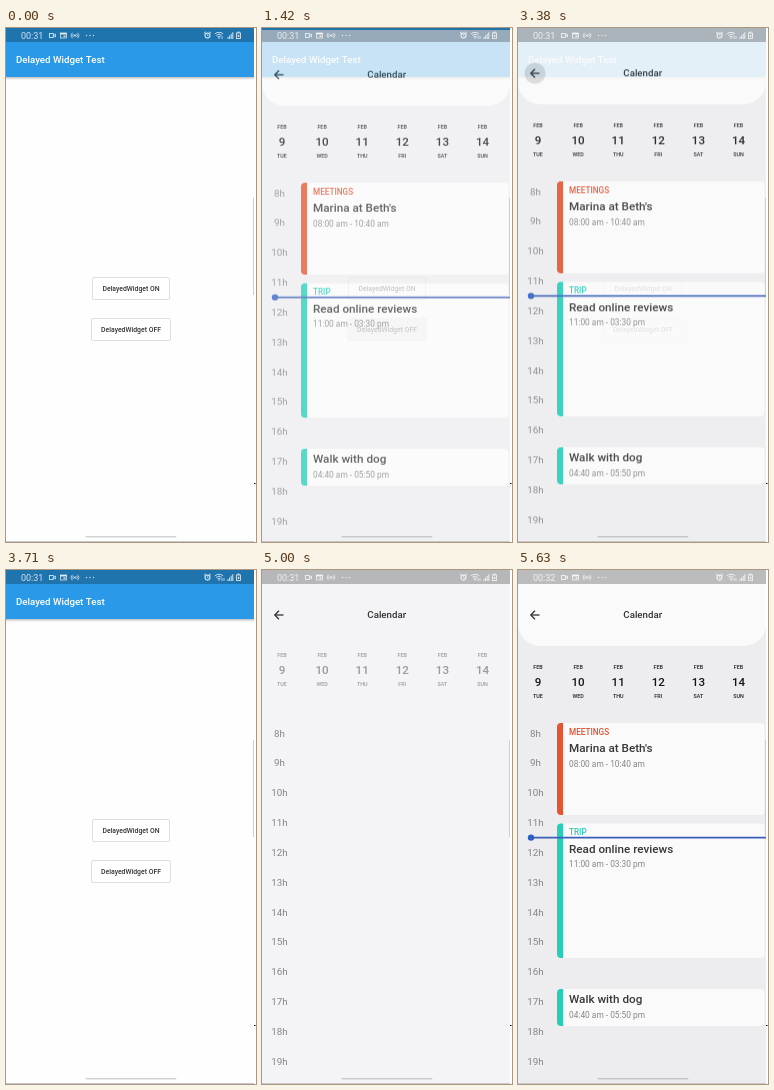
An HTML page with a canvas for the animation above (6.59 s loop, 250 by 514 pixels).

```html
<!DOCTYPE html>
<html lang="en">
<head>
<meta charset="utf-8">
<title>Delayed Widget Test</title>
<style>
  html, body { margin: 0; width: 100%; height: 100%; overflow: hidden; background: #fff; }
  canvas { display: block; width: 250px; height: 514px; }
</style>
</head>
<body>
<canvas id="stage"></canvas>
<script>
const W = 250, H = 514, SCREEN = 248, LOOP = 6590;
const ratio = window.devicePixelRatio || 1;
const TICKS = [0, 920, 1170, 1250, 1330, 1420, 1500, 3380, 3460, 3540, 3630, 3710,
  4670, 4750, 4830, 4920, 5000, 5050, 5130, 5210, 5300, 5380, 5460, 5550, 5630];
const OPEN_OFF = 1165, CLOSE = 3361, OPEN_ON = 4665, ROUTE = 300;

function sized(canvas) {
  canvas.width = W * ratio;
  canvas.height = H * ratio;
  const c = canvas.getContext('2d');
  c.scale(ratio, ratio);
  return c;
}
const stage = sized(document.getElementById('stage'));
const layer = document.createElement('canvas');
const page = sized(layer);

const clamp = v => Math.max(0, Math.min(1, v));
const progress = (t, start, length) => clamp((t - start) / length);

function bezier(x1, y1, x2, y2) {
  const at = (a, b, s) => 3 * a * s * (1 - s) ** 2 + 3 * b * s * s * (1 - s) + s ** 3;
  return x => {
    let lo = 0, hi = 1;
    for (let i = 0; i < 24; i++) {
      const mid = (lo + hi) / 2;
      if (at(x1, x2, mid) < x) lo = mid; else hi = mid;
    }
    return at(y1, y2, lo);
  };
}
const fadeCurve = bezier(0.42, 0, 1, 1);
const slideCurve = bezier(0.4, 0, 0.2, 1);

function text(c, str, x, y, size, weight, color, align = 'left') {
  c.font = `${weight} ${size}px Roboto, sans-serif`;
  c.textAlign = align;
  c.fillStyle = color;
  c.fillText(str, x, y);
}

function box(c, x, y, w, h, color, radii = 0) {
  c.beginPath();
  c.roundRect(x, y, w, h, radii);
  c.fillStyle = color;
  c.fill();
}

function disc(c, x, y, r, color) {
  c.beginPath();
  c.arc(x, y, r, 0, 7);
  c.fillStyle = color;
  c.fill();
}

function lines(c, points, color, width) {
  c.beginPath();
  points.forEach(([x, y], i) => i ? c.lineTo(x, y) : c.moveTo(x, y));
  c.strokeStyle = color;
  c.lineWidth = width;
  c.stroke();
}

function arc(c, x, y, r, from, to) {
  c.beginPath();
  c.arc(x, y, r, from, to);
  c.stroke();
}

function button(c, label, x, y, w, h, pressed) {
  box(c, x, y, w, h, pressed ? '#ebebeb' : '#fff', 1.5);
  c.strokeStyle = pressed ? '#e3e3e3' : '#dedede';
  c.lineWidth = 1;
  c.stroke();
  text(c, label, 125, y + h / 2 + 2.4, 6.85, 500, '#333', 'center');
}

function home(c, pressed) {
  box(c, 0, 0, SCREEN, H, '#fefefe');
  const shade = c.createLinearGradient(0, 49, 0, 52);
  shade.addColorStop(0, 'rgba(0,0,0,.24)');
  shade.addColorStop(1, 'rgba(0,0,0,0)');
  box(c, 0, 49, SCREEN, 3, shade);
  box(c, 0, 0, SCREEN, 49, '#2a9ae8');
  text(c, 'Delayed Widget Test', 10, 35, 9.7, 500, '#fff');
  button(c, 'DelayedWidget ON', 86.5, 249.5, 77, 22, pressed === 'on');
  button(c, 'DelayedWidget OFF', 85.5, 290.5, 79, 22, pressed === 'off');
}

function dates(c) {
  ['TUE', 'WED', 'THU', 'FRI', 'SAT', 'SUN'].forEach((day, i) => {
    const x = 20 + i * 40.1;
    text(c, 'FEB', x, 99, 5.4, 500, '#222', 'center');
    text(c, String(9 + i), x, 116, 11.6, 500, '#151515', 'center');
    text(c, day, x, 128.2, 5.4, 500, '#222', 'center');
  });
}

function card(c, y, h, color, label, title, hours) {
  box(c, 39, y, 207.5, h, '#fafafa', 4);
  box(c, 39, y, 6, h, color, [4, 0, 0, 4]);
  if (label) text(c, label, 51, y + 11.5, 8.2, 500, color);
  const base = y + (label ? 29.3 : 14.3);
  text(c, title, 51, base, 11.7, 500, '#383838');
  text(c, hours, 51, base + 14.4, 8.35, 400, '#858585');
}

function events(c) {
  card(c, 153, 92, '#e5532f', 'MEETINGS', "Marina at Beth's", '08:00 am - 10:40 am');
  card(c, 253.5, 134.5, '#26cdb8', 'TRIP', 'Read online reviews', '11:00 am - 03:30 pm');
  card(c, 419, 37, '#26cdb8', '', 'Walk with dog', '04:40 am - 05:50 pm');
  lines(c, [[13, 267.6], [SCREEN, 267.6]], '#3a5fb8', 1.7);
  disc(c, 13, 267.6, 3.2, '#2f5fc4');
}

// shown: how far the backdrop, date row and events have appeared, 0 to 1.
function calendar(c, shown, backPressed) {
  c.clearRect(0, 0, W, H);
  box(c, 0, 0, SCREEN, H, '#f4f4f6');
  c.globalAlpha = shown.backdrop;
  box(c, 0, 0, SCREEN, H, '#ededf0');
  box(c, 0, 0, SCREEN, 76, '#fafafa', [0, 0, 22, 22]);
  c.globalAlpha = 1;

  if (backPressed) disc(c, 17, 45, 10.5, '#dadada');
  lines(c, [[21.5, 45], [13, 45]], '#333', 1.3);
  lines(c, [[17, 40.8], [12.8, 45], [17, 49.2]], '#333', 1.3);
  text(c, 'Calendar', 124.7, 48.2, 9.7, 500, '#333', 'center');

  for (let i = 0; i < 12; i++) {
    text(c, `${8 + i}h`, 17.5, 166.6 + i * 29.82, 9.8, 400, '#858588', 'center');
  }

  c.save();
  c.globalAlpha = shown.dates;
  c.translate(0, -20 * (1 - shown.dates));
  dates(c);
  c.restore();

  c.save();
  c.globalAlpha = shown.events;
  c.translate(-60 * (1 - shown.events) ** 2, 0);
  events(c);
  c.restore();
}

function statusBar(c, clock, traffic) {
  box(c, 0, 0, SCREEN, 14, 'rgba(0,0,0,.25)');
  c.save();
  c.globalAlpha = 0.8;
  text(c, clock, 15, 11, 9, 400, '#fff');
  c.strokeStyle = '#fff';
  c.lineWidth = 0.9;
  c.strokeRect(43.5, 5.5, 3.8, 4);
  lines(c, [[47.5, 7.5], [49.5, 6], [49.5, 9], [47.5, 7.5]], '#fff', 0.8);
  c.strokeRect(54.5, 5, 6, 5);
  box(c, 54.5, 5, 6, 1.5, '#fff');
  box(c, 57.5, 7.5, 2, 1.5, '#fff');
  disc(c, 69, 7.5, 1, '#fff');
  c.lineWidth = 0.8;
  for (const r of [2.2, 3.8]) {
    arc(c, 69, 7.5, r, -0.8, 0.8);
    arc(c, 69, 7.5, r, Math.PI - 0.8, Math.PI + 0.8);
  }
  for (const x of [80.5, 84, 87.5]) disc(c, x, 7.5, 0.7, '#fff');

  c.lineWidth = 1.1;
  arc(c, 201.5, 7.6, 2.5, 0, 7);
  lines(c, [[201.5, 6.3], [201.5, 7.8], [202.8, 7.8]], '#fff', 0.7);
  lines(c, [[198, 5.2], [199.8, 3.8]], '#fff', 1);
  lines(c, [[203.2, 3.8], [205, 5.2]], '#fff', 1);
  c.lineWidth = 0.9;
  for (const r of [2.2, 4.2, 6.2]) arc(c, 213, 10.5, r, -2.3, -0.84);
  disc(c, 213, 10, 0.8, '#fff');
  lines(c, [[216, 11], [216, 8]], '#fff', 0.8);
  if (traffic) lines(c, [[218, 8], [218, 11]], '#fff', 0.8);
  for (let i = 0; i < 4; i++) box(c, 221.5 + i * 1.6, 9 - i * 1.6, 1, 2 + i * 1.6, '#fff');
  c.lineWidth = 0.9;
  c.strokeRect(230.5, 5, 4, 5.5);
  box(c, 231.5, 3.6, 2, 1.2, '#fff');
  box(c, 231.8, 6.8, 1.5, 2.2, '#fff');
  c.restore();
}

function routeAt(t) {
  if (t < CLOSE) return progress(t, OPEN_OFF, ROUTE);
  if (t < OPEN_ON) return 1 - progress(t, CLOSE, ROUTE);
  return progress(t, OPEN_ON, ROUTE);
}

function draw(t) {
  const c = stage;
  const route = routeAt(t);
  const closing = t >= CLOSE && t < OPEN_ON;
  const delayed = t >= OPEN_ON;
  box(c, 0, 0, W, H, '#fff');
  c.save();
  c.beginPath();
  c.rect(0, 0, SCREEN, H);
  c.clip();
  home(c, route === 0 || closing ? '' : delayed ? 'on' : 'off');
  if (route > 0) {
    const shown = delayed
      ? { backdrop: progress(t, 5000, 200), dates: progress(t, 4890, 270), events: progress(t, 5230, 400) }
      : { backdrop: 1, dates: 1, events: 1 };
    calendar(page, shown, closing);
    c.globalAlpha = fadeCurve(route);
    c.drawImage(layer, 0, (1 - slideCurve(route)) * H / 4, W, H);
    c.globalAlpha = 1;
  }
  statusBar(c, t < 5380 ? '00:31' : '00:32', t >= 920);
  box(c, 79.5, 508, 91, 1.6, 'rgba(0,0,0,.17)', 0.8);
  box(c, 0, 513, SCREEN, 1, '#c8c8c8');
  box(c, 247, 170, 1, 97, '#cfcfcf');
  c.restore();
  box(c, 248, 455, 1.5, 1, '#000');
}

const begin = performance.now();
function tick() {
  const t = Math.max(0, performance.now() - begin) % LOOP;
  draw(TICKS.findLast(mark => mark <= t));
  requestAnimationFrame(tick);
}
tick();
</script>
</body>
</html>
```
